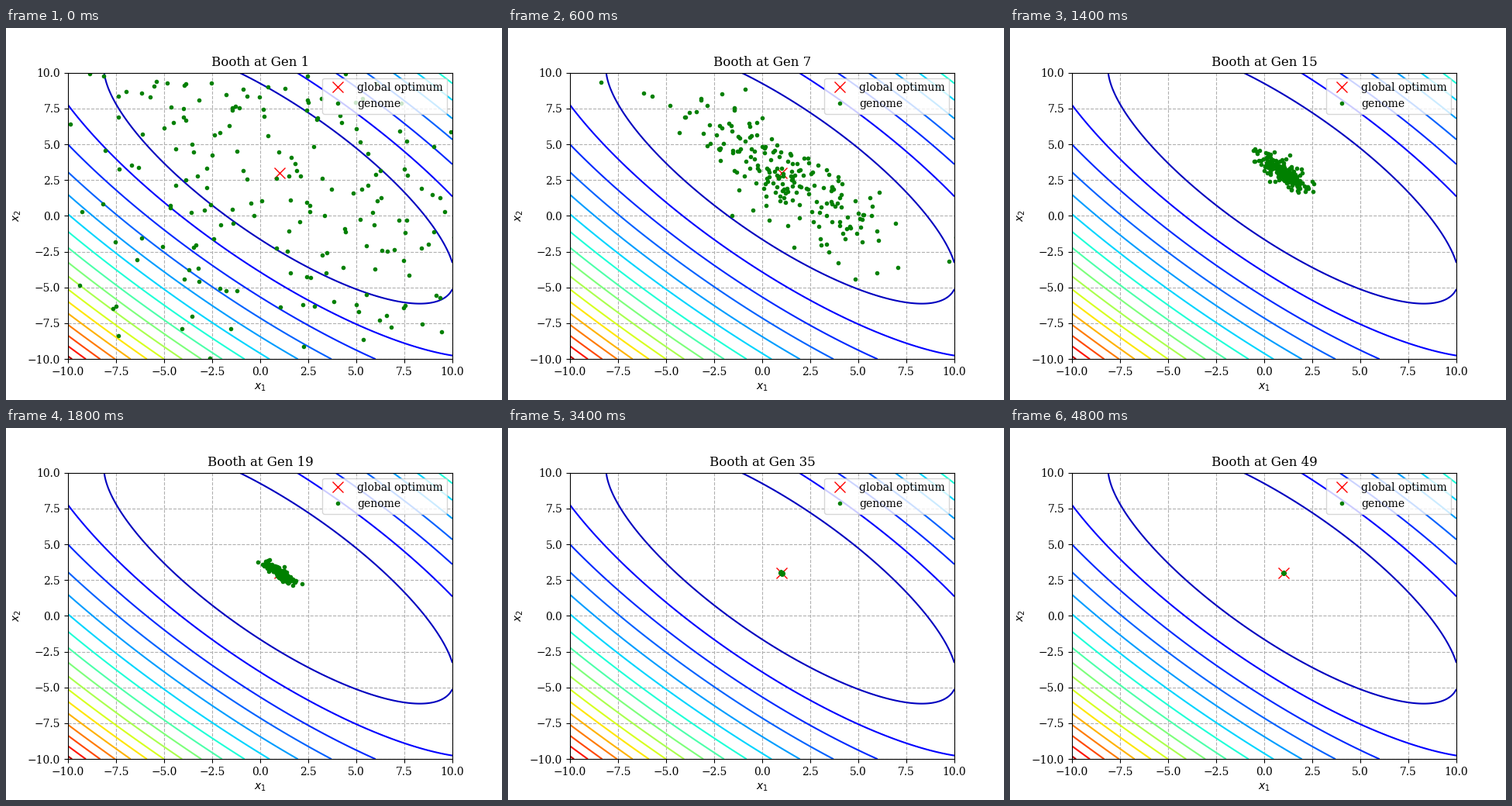
These frames come from a looping animation (640 px wide and 480 px high, 4900 ms). A matplotlib script:

```python
import numpy as np
import matplotlib.pyplot as plt
from matplotlib.animation import FuncAnimation

GENS = 49
POP = 200
F, CR = 0.8, 0.9
LIM = 10


def booth(x, y):
    return (x + 2 * y - 7) ** 2 + (2 * x + y - 5) ** 2


def evolve(pop, rng):
    """One generation of differential evolution (rand/1/bin)."""
    n, dim = pop.shape
    picks = np.array([rng.choice(n - 1, 3, replace=False) for _ in range(n)])
    picks += picks >= np.arange(n)[:, None]  # skip the parent itself
    a, b, c = (pop[picks[:, k]] for k in range(3))
    cross = rng.random((n, dim)) < CR
    cross[np.arange(n), rng.integers(dim, size=n)] = True
    trial = np.where(cross, a + F * (b - c), pop)
    better = booth(*trial.T) < booth(*pop.T)
    return np.where(better[:, None], trial, pop)


def run(seed):
    rng = np.random.default_rng(seed)
    pop = rng.uniform(-LIM, LIM, (POP, 2))
    history = []
    for _ in range(GENS):
        pop = evolve(pop, rng)
        history.append(pop)
    return history


history = run(7)

plt.rcParams["font.family"] = "DejaVu Serif"
fig, ax = plt.subplots(figsize=(6.4, 4.8), dpi=100)

side = np.linspace(-LIM, LIM, 201)
X, Y = np.meshgrid(side, side)
ax.contour(X, Y, booth(X, Y), levels=np.arange(0, 2701, 150), cmap="jet")
ax.grid(linestyle="--")
ax.plot(1, 3, "rx", markersize=10, label="global optimum")
dots, = ax.plot([], [], "g.", label="genome")

ax.set_xlim(-LIM, LIM)
ax.set_ylim(-LIM, LIM)
ax.set_xlabel("$x_1$")
ax.set_ylabel("$x_2$")
ax.legend(loc="upper right")
title = ax.set_title("")


def update(i):
    dots.set_data(*history[i].T)
    title.set_text(f"Booth at Gen {i + 1}")
    return dots, title


anim = FuncAnimation(fig, update, frames=GENS, init_func=lambda: update(0),
                     interval=100, repeat=True, repeat_delay=0)
plt.show()
```
